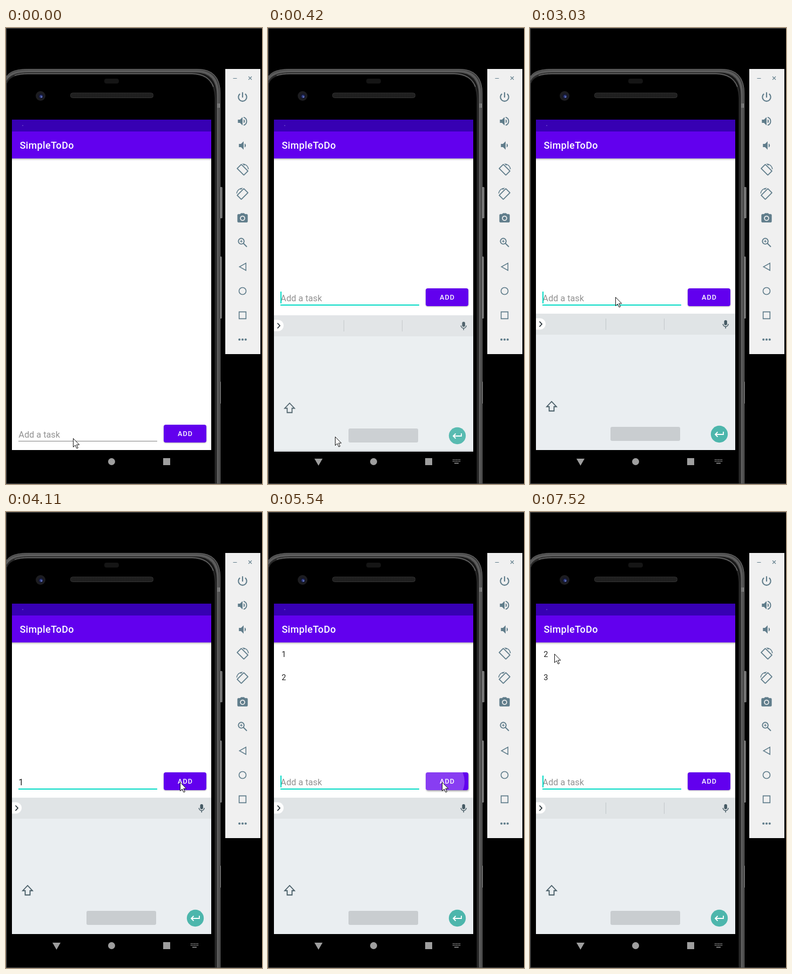
Recreate the animation shown at these times as an HTML page. Size 474 by 846 pixels, loop 8000 ms.

```html
<!DOCTYPE html>
<html lang="en">
<head>
<meta charset="utf-8">
<title>To-do list demo</title>
<style>
html, body { margin: 0; width: 100%; height: 100%; overflow: hidden; background: #000; }
svg { display: block; width: 474px; height: 846px; }
text { font-family: Roboto, sans-serif; }
.line { fill: none; stroke: #607d8b; stroke-width: 2; }
#shade { filter: drop-shadow(0 1.5px .8px rgba(0,0,0,.3)); }
#shade.pressed { filter: drop-shadow(1px 2.5px 1.5px rgba(0,0,0,.35)); }
</style>
</head>
<body>
<svg viewBox="0 0 474 846">
  <defs>
    <linearGradient id="key">
      <stop offset="0" stop-color="#444"/><stop offset=".55" stop-color="#858585"/><stop offset="1" stop-color="#4a4a4a"/>
    </linearGradient>
    <linearGradient id="drop" x2="0" y2="1">
      <stop offset="0" stop-opacity=".26"/><stop offset="1" stop-opacity="0"/>
    </linearGradient>
    <pattern id="mesh" width="3" height="3" patternUnits="userSpaceOnUse">
      <rect width="3" height="3" fill="#242424"/><circle cx="1.5" cy="1.5" r=".8" fill="#0c0c0c"/>
    </pattern>
    <clipPath id="buttonClip"><rect x="292" y="483" width="79" height="33" rx="4"/></clipPath>
  </defs>

  <rect width="474" height="846"/>

  <g id="phone">
    <g fill="url(#key)">
      <rect x="395" y="295" width="6" height="58" rx="1.5"/>
      <rect x="395" y="424" width="5" height="115" rx="1.5"/>
      <rect x="395" y="656" width="3" height="41" rx="1"/>
    </g>
    <path d="M0 91Q8 76 40 76H354Q397 76 397 121V846H0Z" fill="#3a3a3a"/>
    <path d="M0 91.500Q8 76.500 40 76.500H354Q396.500 76.500 396.500 121V846" fill="none" stroke="#777"/>
    <path d="M0 96Q8 80 42 80H352Q392.500 80 392.500 124V846" fill="none" stroke="#5c5c5c" stroke-width="4"/>
    <path d="M1 99Q8 83 42 83H350Q390 83 390 126V846H1Z" fill="#161616"/>
    <path d="M1 102Q6 85 40 85H346Q387 86 388 130V846" fill="none" stroke="#2b2b2b" stroke-width="2"/>
    <path d="M16 88Q26 84.500 42 84.500H344Q375 85 384 109" fill="none" stroke="#8a8a8a"/>
    <path d="M2 104Q6 87 40 87H346Q385 88 386 130V846H2Z"/>
    <path d="M391 140h6v8h-6z" fill="#777"/>
    <rect x="182" y="94" width="27" height="9" rx="4" fill="#151515"/>
    <rect x="119.500" y="120.500" width="153" height="9" rx="4" fill="url(#mesh)" stroke="#333"/>
    <circle cx="64" cy="126" r="9" fill="#1d1d20"/>
    <circle cx="64.500" cy="126.500" r="5" fill="#15172d"/>
    <circle cx="65" cy="127" r="2.700" fill="#35438b"/>
    <circle cx="66" cy="128" r="1" fill="#8c9de0"/>
  </g>
  <path d="M474 .5H.5V845.500H474" fill="none" stroke="#555"/>

  <rect x="11" y="170" width="369" height="613" fill="#fff"/>
  <rect x="11" y="242" width="369" height="4" fill="url(#drop)"/>
  <rect x="11" y="170" width="369" height="22" fill="#3700b3"/>
  <circle cx="31" cy="181" r="1" fill="#6a45c8"/>
  <rect x="11" y="192" width="369" height="50" fill="#6200ee"/>
  <text x="25.400" y="223.500" font-size="18" font-weight="500" letter-spacing=".36" fill="#fff">SimpleToDo</text>

  <g id="items" font-size="14.400" fill="#212121">
    <text x="25.300" y="269"></text><text x="25.300" y="312"></text><text x="25.300" y="355"></text>
  </g>

  <g id="row">
    <text id="field" x="23.300" y="507" font-size="16.250"></text>
    <rect id="underline" x="23" width="257"/>
    <rect id="caret" y="489" width="2" height="22" fill="#03dac5"/>
    <rect id="shade" x="292" y="483" width="79" height="33" rx="4" fill="#6200ee"/>
    <circle id="ripple" cx="322" cy="500" fill="#fff" fill-opacity=".24" clip-path="url(#buttonClip)"/>
    <text x="318" y="504" font-size="12.570" font-weight="500" letter-spacing="1.120" fill="#fff">ADD</text>
  </g>

  <g fill="#9e9e9e">
    <circle cx="195.500" cy="804.500" r="6.500"/>
    <rect x="291" y="798" width="13" height="13"/>
    <g id="navExtras">
      <path d="M86 799h15l-7.500 13z"/>
      <path d="M342 801h14M342 804h14" stroke="#9e9e9e" stroke-width="1.500" stroke-dasharray="1.500 1"/>
      <path d="M345 807.500h8" stroke="#9e9e9e" stroke-width="1.500"/>
    </g>
  </g>

  <g id="keyboard">
    <rect x="11" y="530" width="369" height="253" fill="#eaeef1"/>
    <rect x="11" y="530" width="369" height="39" fill="#e0e4e6"/>
    <path id="dividers" d="M140.500 539v21M248.500 539v21" stroke="#c1c6c9"/>
    <path d="M11 538.500h7.500a10.500 10.500 0 0 1 0 21H11z" fill="#fff"/>
    <path d="M17.500 544.500l4.500 4.800-4.500 4.800" fill="none" stroke="#263238" stroke-width="1.700"/>
    <g fill="none" stroke="#455a64" stroke-width="1.500">
      <rect x="360.200" y="542.700" width="4" height="8" rx="2" fill="#455a64"/>
      <path d="M357.300 549a4.900 4.900 0 0 0 9.800 0M362.200 554v3.500"/>
      <path d="M40 693l-9 9.500h4.500v8h9v-8H49z" stroke-width="1.800"/>
    </g>
    <rect x="149" y="740" width="129" height="26" rx="3" fill="#c9cdd0"/>
    <circle cx="350.500" cy="753.500" r="15.700" fill="#4db6ac"/>
    <path d="M358 749v5h-14.500M347.500 749.500l-4.500 4.500 4.500 4.500" fill="none" stroke="#fff" stroke-width="1.800"/>
  </g>

  <g id="toolbar">
    <rect x="406" y="76" width="65" height="529" fill="#f0f0f0"/>
    <path class="line" style="stroke-width:1.100" d="M420.500 93.500h7M449 90l6 6m0-6l-6 6"/>
  </g>

  <path id="pointer" d="M.5 .5v16l3.700-3.500 2.800 6 2.400-1-2.700-5.900h5z" fill="#fff" stroke="#111"/>
</svg>

<script>
const $ = id => document.getElementById(id);

// Toolbar icons on a 24-unit grid, one every 45px.
const line = (d, w = 2) => `<path class="line" style="stroke-width:${w}" d="${d}"/>`;
const fill = d => `<path fill="#607d8b" fill-rule="evenodd" d="${d}"/>`;
const rotate = line('M9.200 1.900L1.900 9.200a.5 .5 0 0 0 0 .7L14.100 22.100a.5 .5 0 0 0 .7 0L22.100 14.800a.5 .5 0 0 0 0-.7L9.900 1.900a.5 .5 0 0 0-.7 0z', 1.900)
  + fill('M16.500 2.500a10.500 10.500 0 0 1 6 8.500H24A12 12 0 0 0 11.300 0l3.900 3.900z');
const icons = [
  line('M12 3v10M7 5.900a8 8 0 1 0 10 0', 2.200),
  fill('M3 9v6h4l5 5V4L7 9zM14 8v8a4.500 4.500 0 0 0 0-8z') + line('M14 4.300a8 8 0 0 1 0 15.400'),
  fill('M5 9v6h4l5 5V4L9 9zM16 8v8a4.500 4.500 0 0 0 0-8z'),
  rotate,
  `<g transform="matrix(-1 0 0 1 24 0)">${rotate}</g>`,
  fill('M9 2L7.200 4H4a2 2 0 0 0-2 2v12a2 2 0 0 0 2 2h16a2 2 0 0 0 2-2V6a2 2 0 0 0-2-2h-3.200L15 2zM12 7a5 5 0 1 1 0 10 5 5 0 0 1 0-10z')
    + '<circle cx="12" cy="12" r="3.200" fill="#607d8b"/>',
  line('M15 9.500a5.500 5.500 0 1 1-11 0 5.500 5.500 0 0 1 11 0zM13.800 13.800l6.500 6.500') + line('M9.500 7v5M7 9.500h5', 1.300),
  line('M18.500 5v14L6 12z', 1.600),
  line('M18.800 12a6.800 6.800 0 1 1-13.600 0 6.800 6.800 0 0 1 13.600 0z', 1.700),
  line('M5.400 5.400h13.200v13.200H5.400z', 1.700),
  [6, 12, 18].map(x => `<circle cx="${x}" cy="12" r="2.200" fill="#607d8b"/>`).join('')
];
$('toolbar').insertAdjacentHTML('beforeend', icons.map((icon, i) =>
  `<g transform="translate(438 ${128 + i * 45}) scale(.96) translate(-12 -12)">${icon}</g>`).join(''));

// Each step keeps the earlier values that it does not change.
const DURATION = 8000;
const steps = [
  { t: 0, at: [124, 761], raised: 0, focus: 0, caret: 0, text: '', items: '', ripple: 0, dividers: 1, slide: 0, alpha: 0 },
  { t: 150, focus: 1, caret: 1 },
  { t: 280, raised: 1, slide: 40, alpha: .5 },
  { t: 420, at: [124, 758], slide: 3, alpha: .93 },
  { t: 540, slide: 0, alpha: 1 },
  { t: 720, at: [126, 735] },
  { t: 900, at: [138, 680] },
  { t: 1080, at: [147, 641] },
  { t: 1210, at: [152, 632] },
  { t: 1350, at: [170, 615] },
  { t: 1480, at: [200, 592], caret: 0 },
  { t: 1620, at: [236, 566] },
  { t: 1760, at: [272, 545] },
  { t: 1900, at: [306, 528] },
  { t: 2030, at: [330, 517], caret: 1 },
  { t: 2170, at: [343, 512] },
  { t: 2320, at: [262, 506] },
  { t: 2470, at: [158, 499], caret: 0 },
  { t: 3030, caret: 1 },
  { t: 3430, text: '1', dividers: 0 },
  { t: 3720, at: [205, 500] },
  { t: 3850, at: [268, 501] },
  { t: 3980, at: [309, 501], caret: 0 },
  { t: 4110, at: [322, 501] },
  { t: 4380, text: '', items: '1', caret: 1, ripple: 22 },
  { t: 4510, ripple: 42 },
  { t: 4640, ripple: 0, dividers: 1 },
  { t: 4760, text: '2', dividers: 0 },
  { t: 5150, caret: 0 },
  { t: 5410, text: '', items: '12', caret: 1, ripple: 22 },
  { t: 5540, ripple: 42 },
  { t: 5660, text: '3', ripple: 0 },
  { t: 5780, text: '', items: '123', ripple: 22 },
  { t: 5900, ripple: 42 },
  { t: 6020, ripple: 0, dividers: 1 },
  { t: 6300, at: [262, 441], caret: 0 },
  { t: 6450, at: [150, 340] },
  { t: 6600, at: [66, 280] },
  { t: 6740, at: [45, 263], caret: 1 },
  { t: 7020, caret: 0 },
  { t: 7520, items: '23', caret: 1 }
];
steps.forEach((step, i) => { steps[i] = { ...steps[i - 1], ...step }; });

function set(id, attrs) {
  for (const name in attrs) $(id).setAttribute(name, attrs[name]);
}

function draw(s) {
  set('pointer', { transform: `translate(${s.at})` });
  set('row', { transform: `translate(0 ${s.raised ? 0 : 253})` });
  set('underline', s.focus ? { y: 513, height: 2, fill: '#03dac5' } : { y: 513, height: 1, fill: '#7f7f7f' });
  set('caret', { x: s.text ? 32 : 23, opacity: s.caret });
  set('field', { fill: s.text ? '#212121' : '#929292' });
  $('field').textContent = s.text || 'Add a task';
  [...$('items').children].forEach((item, i) => { item.textContent = s.items[i] || ''; });
  set('ripple', { r: s.ripple });
  set('shade', { class: s.ripple ? 'pressed' : '' });
  set('dividers', { opacity: s.dividers });
  set('keyboard', { transform: `translate(0 ${s.slide})`, opacity: s.alpha });
  set('navExtras', { opacity: s.alpha ? 1 : 0 });
}

const start = performance.now();
let shown;
function tick() {
  const time = (performance.now() - start) % DURATION;
  const step = steps.findLast(s => s.t <= time);
  if (step !== shown) draw(shown = step);
  requestAnimationFrame(tick);
}
tick();
</script>
</body>
</html>
```
